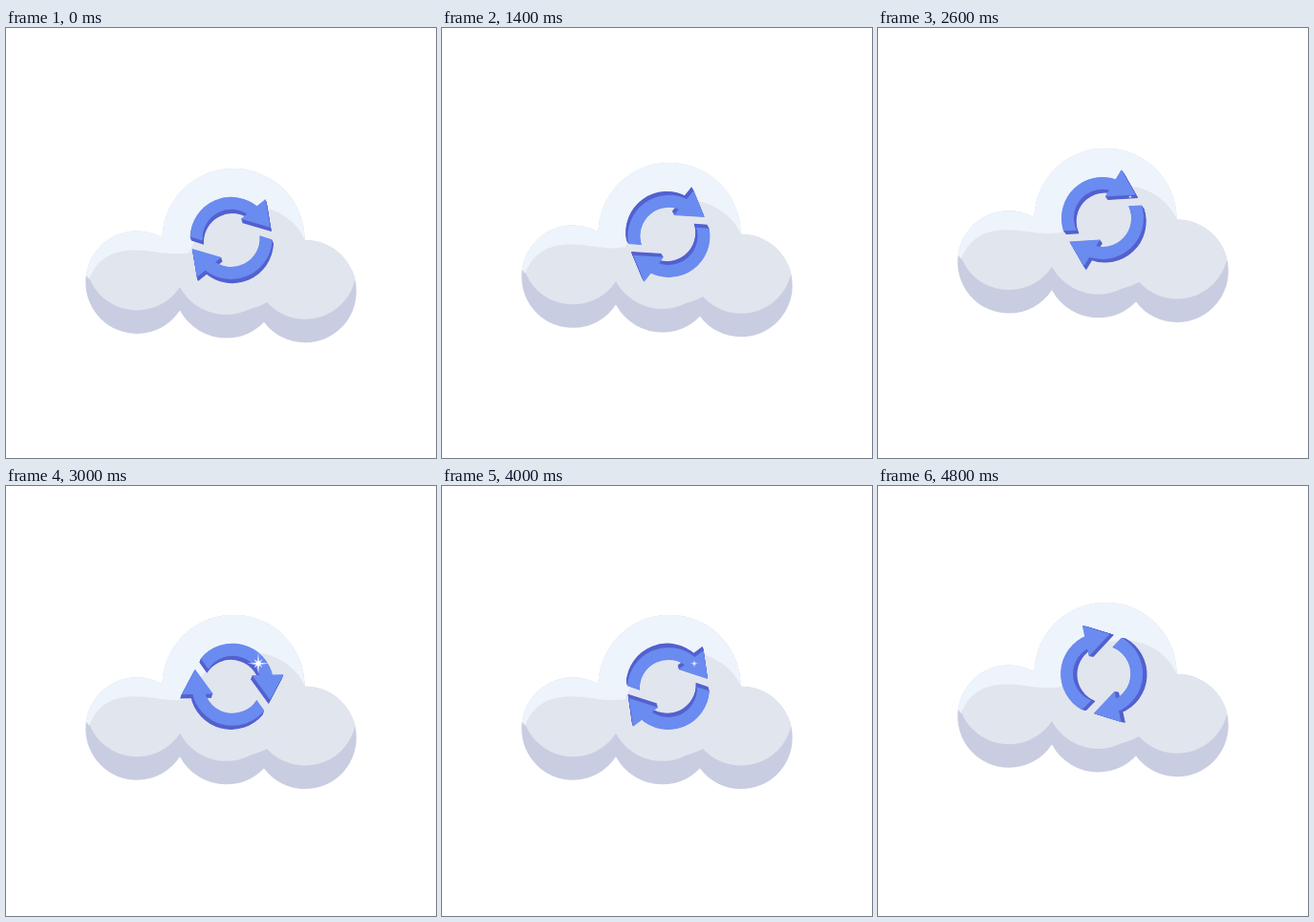
An HTML page for the animation above (5000 ms loop, 450 by 450 pixels).

```html
<!DOCTYPE html>
<html lang="en">
<head>
<meta charset="utf-8">
<title>Cloud sync</title>
<style>
  html, body { margin: 0; height: 100%; overflow: hidden; background: #fff; }
  svg { display: block; width: 100vw; height: 100vh; }
</style>
</head>
<body>
<svg viewBox="0 0 450 450">
  <defs>
    <g id="puffs">
      <circle cx="137" cy="266.2" r="53.7"/>
      <circle cx="230.4" cy="269.5" r="55"/>
      <circle cx="313" cy="275.6" r="53.7"/>
    </g>
    <clipPath id="cloud">
      <circle cx="137" cy="266.2" r="53.7"/>
      <circle cx="230.4" cy="269.5" r="55"/>
      <circle cx="313" cy="275.6" r="53.7"/>
      <circle cx="238" cy="221.5" r="74.5"/>
    </clipPath>
    <!-- One arrow of the ring, centred on the origin -->
    <path id="arrow" d="M-43 0A43 43 0 0 1 27.6-33L19.3-23A30 30 0 0 0-29.8 3.6ZM34.5-42 40.5-12.5 9.5-20.5Z"/>
    <g id="pair">
      <use href="#arrow"/>
      <use href="#arrow" transform="rotate(180)"/>
    </g>
  </defs>

  <g id="bob">
    <g clip-path="url(#cloud)">
      <rect x="80" y="140" width="290" height="192" fill="#c9cde1"/>
      <g fill="#e1e5ee">
        <use href="#puffs" y="-24.5"/>
        <circle cx="238" cy="221" r="75"/>
      </g>
      <path fill="#eef4fb" d="M80 140V254L87 263C95 243 109 233 133 232.5C155 232 172 239.5 192 235C201 212 214 196 240 188.5C272 180 302 197 313 222L330 205V140Z"/>
    </g>
    <g id="sync"></g>
    <path id="star" fill="#fff"/>
  </g>
</svg>
<script>
  const LOOP = 5000, STEP = 200, DELAY = 240;
  const byId = id => document.getElementById(id);
  const bob = byId('bob'), sync = byId('sync'), star = byId('star');

  // Stacked copies give the arrows their thickness.
  const layer = (k, color) =>
    `<use href="#pair" x="${-0.7 + 1.4 * k}" y="${-2.1 + 4.2 * k}" fill="${color}"/>`;
  let layers = '';
  for (let i = 8; i > 0; i--) layers += layer(i / 8, '#5361cf');
  sync.innerHTML = layers + layer(0, '#6a8bf0');

  const rays = Array.from({ length: 16 }, (_, i) => {
    const r = i % 2 ? 2.7 : i % 4 ? 8 : 14;
    const a = i * Math.PI / 8;
    return `${(r * Math.cos(a)).toFixed(2)} ${(r * Math.sin(a)).toFixed(2)}`;
  });
  star.setAttribute('d', `M${rays.join('L')}Z`);

  function draw(now) {
    const t = Math.floor(now % LOOP / STEP) * STEP;
    const pose = t ? t - DELAY : 0;
    const lift = 13 * (Math.cos(pose * 2 * Math.PI / 1000) - 1);
    const glint = t > 2500 && t < 4180 ? Math.sin(Math.PI * (t - 2500) / 1680) : 0;

    bob.setAttribute('transform', `translate(0 ${lift})`);
    sync.setAttribute('transform', `translate(236.3 222) rotate(${2 + pose * 0.144})`);
    star.setAttribute('transform', `translate(264 198) scale(${glint})`);
  }

  const start = performance.now();
  function tick() {
    draw(performance.now() - start);
    requestAnimationFrame(tick);
  }
  tick();
</script>
</body>
</html>
```
